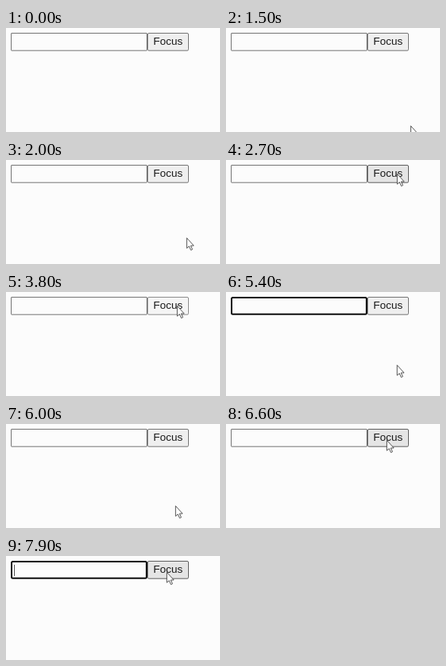
These frames come from a looping animation (268 px wide and 130 px high, 8000 ms). An HTML page:

```html
<!DOCTYPE html>
<html lang="en">
<head>
<meta charset="utf-8">
<title>Focus an input</title>
<style>
html, body { margin: 0; width: 100%; height: 100%; overflow: hidden; background: #fcfcfc; }
svg { display: block; width: 100%; height: 100%; }
text { font: 13.5px "Liberation Sans", Arial, sans-serif; fill: #1a1a1a; }
</style>
</head>
<body>
<svg viewBox="0 0 268 130">
  <rect width="268" height="130" fill="#fcfcfc"/>
  <rect id="field" fill="#fcfcfc"/>
  <rect id="caret" x="10" y="11" width="1" height="14" fill="#555"/>
  <rect id="button" x="177.5" y="6.5" width="51" height="21.7" rx="1.5"/>
  <text x="184.5" y="21.3">Focus</text>
  <path id="pointer" d="M.4 .4V13.2L3.4 10.7L5.5 15.6L7.5 14.7L5.4 10H9.2Z"
    fill="#fff" stroke="#444" stroke-width=".9" stroke-linejoin="round"/>
</svg>
<script>
const LOOP = 8000, STEP = 100, BLINK = 500;
const [field, caret, button, pointer] =
  ['field', 'caret', 'button', 'pointer'].map(id => document.getElementById(id));

// Each move starts where the previous one ended
const entry = { x: 231, y: 122 };
const moves = [
  { start: 1500, end: 1800, x: 227.7, y: 108.5 },
  { start: 1900, end: 2700, x: 214, y: 17 },
  { start: 5100, end: 5500, x: 213.8, y: 115.7 },
  { start: 5900, end: 6600, x: 201, y: 20 }
];
const press = 3800, blur = 5700, refocus = 7500;

const set = (el, attrs) => {
  for (const key in attrs) el.setAttribute(key, attrs[key]);
};
const show = (el, on) => set(el, { visibility: on ? 'visible' : 'hidden' });
const clamp = k => Math.min(1, Math.max(0, k));

function tipAt(t) {
  let { x, y } = entry;
  for (const move of moves) {
    const k = clamp((t - move.start) / (move.end - move.start));
    x += (move.x - x) * k;
    y += (move.y - y) * k;
  }
  return { x, y };
}

function render(time) {
  const t = Math.floor(time % LOOP / STEP) * STEP;
  const { x, y } = tipAt(t);
  const hover = x >= 177 && x < 229 && y >= 6 && y < 28;
  const pressed = t === press;
  const focusStart = t >= refocus ? refocus : press + STEP;
  const focused = t >= focusStart && (t < blur || t >= refocus);

  set(field, focused
    ? { x: 7, y: 7, width: 169, height: 20.7, rx: 1.5, stroke: '#101010', 'stroke-width': 2 }
    : { x: 6.5, y: 6.5, width: 170, height: 21.7, rx: .5, stroke: '#767676', 'stroke-width': 1 });
  show(caret, focused && (t - focusStart) % (2 * BLINK) < BLINK);
  set(button, {
    fill: pressed ? '#f5f5f5' : hover ? '#e5e5e5' : '#efefef',
    stroke: pressed ? '#8d8d8d' : hover ? '#606060' : '#767676'
  });
  show(pointer, t >= moves[0].start);
  set(pointer, { transform: `translate(${x} ${y})` });
}

const start = performance.now();
function frame() {
  render(performance.now() - start);
  requestAnimationFrame(frame);
}
frame();
</script>
</body>
</html>
```
